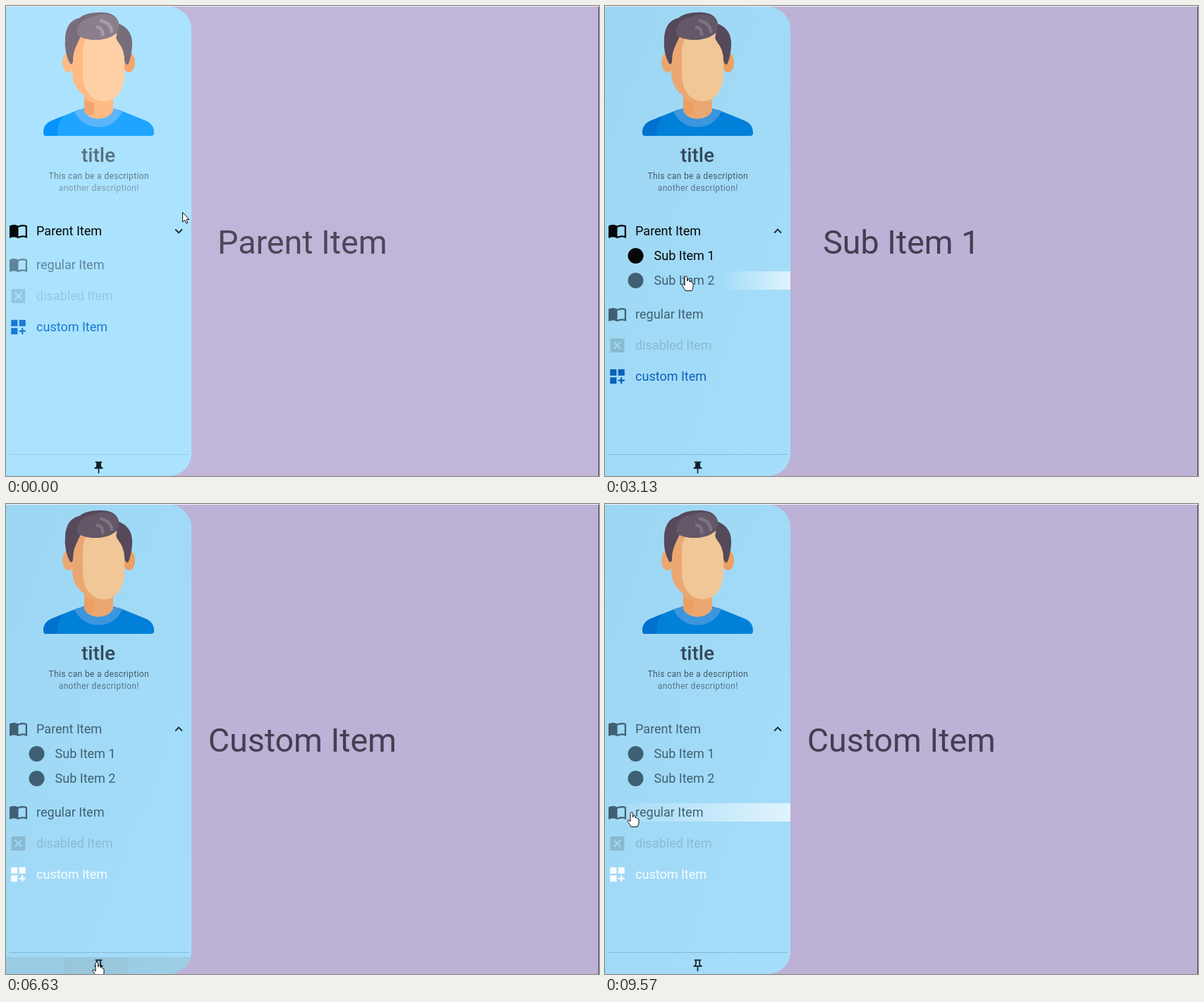
An HTML page for the animation above (9710 ms loop, 841 px wide and 666 px high).

```html
<!DOCTYPE html>
<html lang="en">
<head>
<meta charset="utf-8">
<title>Side menu</title>
<style>
html, body { margin: 0; width: 100%; height: 100%; overflow: hidden; }
svg { display: block; width: 841px; height: 666px; font-family: Roboto, Arial, sans-serif; }
.label { font-size: 18px; }
.mid { text-anchor: middle; }
.title { font-size: 28px; font-weight: 500; fill: var(--title); }
.note { font-size: 12px; letter-spacing: .36px; }
.page { font-size: 46.6px; fill: var(--page); }
.cursor path { fill: #fff; stroke: #111; stroke-width: 1; stroke-linejoin: round; }
</style>
</head>
<body>
<svg id="stage" viewBox="0 0 841 666">
  <defs>
    <linearGradient id="panel" x1="0" y1="0" x2="1" y2="1">
      <stop offset="0" style="stop-color:var(--panelA)"/>
      <stop offset="1" style="stop-color:var(--panelB)"/>
    </linearGradient>
    <linearGradient id="shine">
      <stop offset="0" stop-color="#fff" stop-opacity="0"/>
      <stop offset="1" stop-color="#fff" stop-opacity=".66"/>
    </linearGradient>
    <clipPath id="panelClip"><path id="clipShape"/></clipPath>
    <clipPath id="subClip"><rect id="subShape" width="263" y="336"/></clipPath>
  </defs>

  <rect width="841" height="666" style="fill:var(--bg)"/>
  <text id="page" class="page mid" x="420.3" y="351"></text>

  <g clip-path="url(#panelClip)">
    <rect id="panelBox" height="666" fill="url(#panel)"/>
    <rect id="glow" fill="url(#shine)"/>
    <g id="footGlow">
      <rect y="642" width="263" height="24" fill="#7f9aa3" fill-opacity=".25"/>
      <rect id="ripple" y="642" height="24" fill="#8d9a9f" fill-opacity=".12"/>
    </g>

    <g id="avatar">
      <path style="fill:var(--shirt)" d="M53 180C53 170 58 165 66 162L103 147H160L197 162C205 165 210 170 210 180Q210 184 206 184H57Q53 184 53 180Z"/>
      <path style="fill:var(--shirtDk)" d="M53 180C53 170 58 165 66 162L82 155.500Q73 164 73 184H57Q53 184 53 180Z"/>
      <path style="fill:var(--collar)" d="M97 149.500Q108 171.500 131 171.500Q154 171.500 165 149.500L153 145H110Z"/>
      <path style="fill:var(--skin)" d="M111 122V149Q117 160 131 160Q145 160 152 149V122Z"/>
      <path style="fill:var(--neck)" d="M111 131Q117 135 125 137V153Q117 158 111 149Z"/>
      <ellipse cx="88.500" cy="80" rx="8.500" ry="14" style="fill:var(--skin)"/>
      <ellipse cx="174.500" cy="80" rx="8.500" ry="14" style="fill:var(--neck)"/>
      <path style="fill:var(--skin)" d="M94 80V55L106 34H160L168 55V95Q165 135 136 135Q96 130 94 96Z"/>
      <path style="fill:var(--face)" d="M109 75V62Q110 45 124 38H158L168 58V96C168 120 156 135 138.500 135C121 135 109 119 109 97Z"/>
      <path style="fill:var(--hair)" d="M91 82Q82 66 84 44Q86 21 104 17Q113 9 134 9Q157 9 160 25Q180 33 179 56Q178 73 173 83Q169 83 168 77Q168 62 159 51Q154 45 158 38Q130 55 106 43Q102 51 99 58Q95 67 95 78Q95 83 91 82Z"/>
      <path style="fill:var(--quiff)" d="M101 40C100 22 113 17 124 15C138 8 159 12 160 26C161 42 143 48 128 48C115 48 104 45 101 40Z"/>
      <path d="M128 30Q138 30 137 42M133 20.500Q150 24 150 38" style="fill:none;stroke:var(--curl);stroke-width:4.500"/>
    </g>
    <g id="head">
      <text class="title mid" x="131" y="221">title</text>
      <text class="note mid" x="131.700" y="244.500" style="fill:var(--note1)">This can be a description</text>
      <text class="note mid" x="131.700" y="262" style="fill:var(--note2)">another description!</text>
    </g>

    <circle id="chevronGlow" cx="245" cy="319" r="17" fill="#5f7d8c" fill-opacity=".17"/>
    <g id="rows"></g>
    <g id="chevronBox"><path id="chevron" d="M4.590-3.410L0 1.170-4.590-3.410-6-2 0 4 6-2z" fill="#1c2c36"/></g>
    <rect id="rule" x="5" y="635" height="1" style="fill:var(--rule)"/>
    <path id="pin" fill="#13202a" fill-rule="evenodd"/>
  </g>

  <rect width="841" height="1" fill="#f4f2f7"/>
  <rect x="840" y="1" width="1" height="665" fill="#4b4656"/>

  <g id="arrow" class="cursor"><path d="M.500.500V14L3.600 11.300 5.700 16 7.900 15 5.900 10.500H9.800Z"/></g>
  <g id="hand" class="cursor">
    <path d="M-2 1.500Q-2 0-.300 0Q1.500 0 1.500 1.500V7Q4-.200 5 7.600Q7 6.800 7.600 8.600Q10 8.200 10 11V15Q9.500 18 8 20.500H-1Q-2 18-5 14Q-7 11.500-5.500 10.800Q-4 10.400-2 13Z"/>
  </g>
</svg>

<script>
const LOOP = 9710;
const $ = id => document.getElementById(id);
const lerp = (a, b, p) => a + (b - a) * p;
const clamp = v => Math.max(0, Math.min(1, v));
const ease = p => p * p * (3 - 2 * p);
const ramp = (t, from, to) => ease(clamp((t - from) / (to - from)));
const set = (node, attrs) => { for (const k in attrs) node.setAttribute(k, attrs[k]); };

const BOOK = 'M21 5c-1.110-.350-2.330-.500-3.500-.500-1.950 0-4.050.400-5.500 1.500-1.450-1.100-3.550-1.500-5.500-1.500S2.450 4.900 1 6v14.650c0 .250.250.500.500.500.100 0 .150-.050.250-.050C3.100 20.450 5.050 20 6.500 20c1.950 0 4.050.400 5.500 1.500 1.350-.850 3.800-1.500 5.500-1.500 1.650 0 3.350.300 4.750 1.050.100.050.150.050.250.050.250 0 .500-.250.500-.500V6c-.600-.450-1.250-.750-2-1zm0 13.500c-1.100-.350-2.300-.500-3.500-.500-1.700 0-4.150.650-5.500 1.500V8c1.350-.850 3.800-1.500 5.500-1.500 1.200 0 2.400.150 3.500.500v11.500z';
const CROSS = 'M3 3v18h18V3H3zm14 12.590L15.590 17 12 13.410 8.410 17 7 15.590 10.590 12 7 8.410 8.410 7 12 10.590 15.590 7 17 8.410 13.410 12z';
const TILES = 'M3 3h8v8H3zm10 0h8v8h-8zM3 13h8v8H3zm15 0h-2v3h-3v2h3v3h2v-3h3v-2h-3z';
const DOT = 'M2 12a10 10 0 0 1 20 0a10 10 0 0 1-20 0z';
const PIN = 'M16 9V4h1c.550 0 1-.450 1-1s-.450-1-1-1H7c-.550 0-1 .450-1 1s.450 1 1 1h1v5c0 1.660-1.340 3-3 3v2h5.970v7l1 1 1-1v-7H19v-2c-1.660 0-3-1.340-3-3z';
const PIN_HOLE = 'M14 4v5c0 1.120.370 2.160 1 3H9c.650-.860 1-1.900 1-3V4z';

// [washed, normal, collapsed]
const COLORS = {
  bg: ['#c1b5d9', '#bdb1d6', '#c0b4d8'],
  panelA: ['#abe3ff', '#9dd6f2', '#76d1ff'],
  panelB: ['#abe3ff', '#a5defb', '#76d1ff'],
  page: ['#4d4759', '#443e50', '#48424f'],
  title: ['#58707f', '#34495a', '#34495a'],
  note1: ['#5f7a89', '#41586a', '#41586a'],
  note2: ['#7f9cac', '#57758a', '#57758a'],
  dim: ['#60859a', '#3f6072', '#356c83'],
  off: ['#93c8e3', '#8abad0', '#65b2d8'],
  custom: ['#1b78d0', '#0a60b9', '#0a60b9'],
  rule: ['#96cbe4', '#86b9d2', '#68bce6'],
  shirt: ['#1fa5ff', '#0080d8', '#1fa5ff'],
  shirtDk: ['#0593fb', '#0070cf', '#0593fb'],
  collar: ['#5bb5fb', '#3c96dd', '#5bb5fb'],
  skin: ['#ffba85', '#eba771', '#ffba85'],
  face: ['#ffd0a5', '#f1c798', '#ffd0a5'],
  neck: ['#f2a66d', '#eb9f62', '#f2a66d'],
  hair: ['#786d7b', '#55495a', '#786d7b'],
  quiff: ['#8a7e8b', '#645868', '#8a7e8b'],
  curl: ['#a79ca9', '#7d7280', '#a79ca9']
};
const rgb = hex => [1, 3, 5].map(i => parseInt(hex.slice(i, i + 2), 16));
const mix = (a, b, p) => a.map((v, i) => lerp(v, b[i], p));
const palette = Object.entries(COLORS).map(([name, list]) => [name, list.map(rgb)]);

// y: closed, shift: share of the opened submenu, mini: y when collapsed
const ROWS = {
  parent: { text: 'Parent Item', icon: BOOK, size: 1.136, y: 319, shift: 0, mini: 77, tall: 34 },
  sub1: { text: 'Sub Item 1', icon: DOT, size: 1.1, y: 284, shift: 1, mini: 77, sub: true },
  sub2: { text: 'Sub Item 2', icon: DOT, size: 1.1, y: 319, shift: 1, mini: 77, sub: true },
  regular: { text: 'regular Item', icon: BOOK, size: 1.136, y: 367, shift: 1, mini: 121 },
  disabled: { text: 'disabled Item', icon: CROSS, size: 1.1, y: 411, shift: 1, mini: 164 },
  custom: { text: 'custom Item', icon: TILES, size: 1.14, y: 455, shift: 1, mini: 208 }
};
const PICKS = [
  [0, 'parent', 'Parent Item'], [2500, 'sub1', 'Sub Item 1'], [3550, 'sub2', 'Sub Item 2'],
  [4600, 'regular', 'Regular Item'], [5600, 'custom', 'Custom Item']
];
const HOVERS = [
  [850, 1700, 'parent'], [1800, 3030, 'sub1'], [3030, 3950, 'sub2'], [4150, 5150, 'regular'],
  [5300, 6100, 'custom'], [6400, 7010, 'foot'], [9250, LOOP, 'regular']
];
const PATH = [
  [0, 250, 292], [150, 250, 292], [950, 243, 318], [1130, 243, 320], [1500, 243, 320],
  [2000, 118, 352], [2850, 115, 356], [3130, 115, 383], [3750, 115, 386], [4300, 82, 440],
  [4880, 82, 443], [5400, 86, 522], [5850, 88, 526], [6500, 129, 649], [6900, 129, 650],
  [7380, 400.5, 491.5], [7660, 400.5, 491.5], [8050, 498, 470], [8620, 38, 440], [9570, 38, 437], [LOOP, 38, 437]
];

for (const row of Object.values(ROWS)) {
  const ns = 'http://www.w3.org/2000/svg';
  const make = (tag, parent) => parent.appendChild(document.createElementNS(ns, tag));
  row.node = make('g', $('rows'));
  row.art = make('path', row.node);
  row.label = make('text', row.node);
  row.art.setAttribute('d', row.icon);
  row.label.textContent = row.text;
  row.label.setAttribute('class', 'label');
  if (row.sub) row.node.setAttribute('clip-path', 'url(#subClip)');
}

const latest = (list, t) => list.filter(k => k[0] <= t).pop();

function cursorAt(t) {
  const i = Math.max(1, PATH.findIndex(k => k[0] > t));
  const [a, b] = [PATH[i - 1], PATH[i]];
  const p = ramp(t, a[0], b[0]);
  return [lerp(a[1], b[1], p), lerp(a[2], b[2], p)];
}

function tint(t, mini) {
  const washed = 1 - clamp((t - 50) / 850);
  for (const [name, [light, dark, small]] of palette) {
    const c = mix(mix(dark, light, washed), small, mini).map(Math.round);
    $('stage').style.setProperty('--' + name, `rgb(${c})`);
  }
}

function drawPanel(mini) {
  const w = lerp(263, 53.5, mini), r = lerp(32, 26, mini), l = 26 * mini, x = mini;
  set($('clipShape'), {
    d: `M${x + l} 1H${w - r}A${r} ${r} 0 0 1 ${w} ${1 + r}V${666 - r}A${r} ${r} 0 0 1 ${w - r} 666` +
       `H${x + l}A${l} ${l} 0 0 1 ${x} ${666 - l}V${1 + l}A${l} ${l} 0 0 1 ${x + l} 1Z`
  });
  set($('panelBox'), { width: w });
  set($('rule'), { width: w - 9 + 4 * mini });
  const s = lerp(1, .225, mini);
  set($('avatar'), { transform: `translate(${lerp(131.5, 27, mini)} ${lerp(9, 8, mini)}) scale(${s}) translate(-131.5 -9)` });
  set($('head'), { opacity: clamp(1 - mini * 2), transform: `translate(${(w - 263) / 2} ${-150 * mini})` });
  return w;
}

function render(t) {
  const mini = t < 8000 ? ramp(t, 7010, 7330) : 1 - ramp(t, 8710, 9150);
  const open = ramp(t, 1350, 1650);
  const wide = clamp(1 - mini * 2);
  const [, picked, heading] = latest(PICKS, t);
  tint(t, mini);
  const w = drawPanel(mini);
  $('page').textContent = heading;

  const rowY = row => lerp(row.y + 70 * open * row.shift, row.mini, mini);
  for (const [key, row] of Object.entries(ROWS)) {
    const y = rowY(row);
    const on = key === picked || (key === 'parent' && picked.startsWith('sub'));
    const color = key === 'disabled' ? 'var(--off)'
      : key === 'custom' ? (on ? '#f8fdff' : 'var(--custom)')
      : on ? '#050708' : 'var(--dim)';
    row.node.style.fill = color;
    const cx = row.sub ? 43.5 : 17.5 + 12 * mini;
    const drop = row.icon === BOOK ? -.6 : 0;
    set(row.art, { transform: `translate(${cx} ${y + drop}) scale(${row.size}) translate(-12 -12)` });
    set(row.label, { x: row.sub ? 69.6 : 43.1, y: y + 6.4, opacity: wide });
    if (row.sub) set(row.node, { opacity: open * wide });
  }
  set($('subShape'), { y: 336 - 330 * mini, height: 70 * open });

  const chevronY = rowY(ROWS.parent);
  set($('chevronBox'), { transform: `translate(${w - 18} ${chevronY})`, opacity: wide });
  set($('chevron'), { transform: `rotate(${180 * open}) scale(.92)` });
  set($('pin'), {
    d: t < 6560 ? PIN : PIN + PIN_HOLE, opacity: wide,
    transform: `translate(${w / 2} 654) scale(.85) translate(-12 -12)`
  });

  const hover = HOVERS.find(h => t >= h[0] && t < h[1]);
  const target = hover && ROWS[hover[2]];
  if (target) {
    const grow = clamp((t - hover[0]) / 270);
    const tall = target.tall || 26;
    set($('glow'), { x: w * (1 - grow), width: w * grow, y: rowY(target) - tall / 2, height: tall });
  }
  set($('glow'), { opacity: target ? 1 : 0 });
  set($('chevronGlow'), { opacity: hover && hover[2] === 'parent' ? 1 : 0 });
  set($('footGlow'), { opacity: hover && hover[2] === 'foot' ? 1 : 0 });
  const spread = clamp((t - 6560) / 110) * 70;
  set($('ripple'), { x: Math.max(0, 127.5 - spread), width: Math.min(263, spread * 2) });

  const [x, y] = cursorAt(t);
  const place = `translate(${x} ${y})`;
  const pointing = Boolean(hover);
  set($('arrow'), { transform: place, opacity: pointing ? 0 : 1 });
  set($('hand'), { transform: place, opacity: pointing ? 1 : 0 });
}

const start = performance.now();
function tick() {
  render((performance.now() - start) % LOOP);
  requestAnimationFrame(tick);
}
tick();
</script>
</body>
</html>
```
